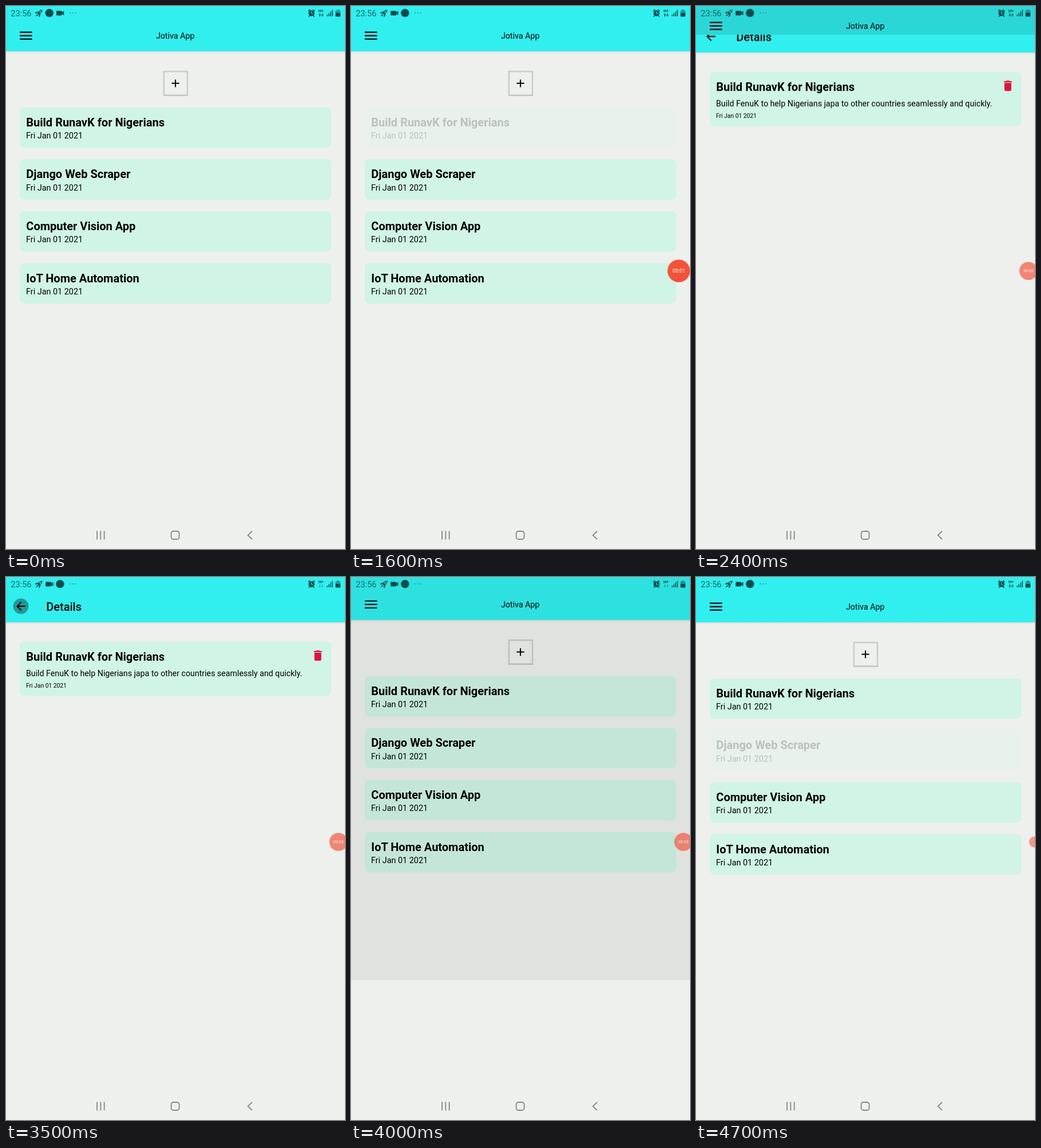
Recreate the animation shown at these times as an HTML page. Size 592x947 px, loop 5000 ms.

```html
<!DOCTYPE html>
<html lang="en">
<head>
<meta charset="utf-8">
<title>Idea list</title>
<style>
  html, body { margin: 0; height: 100%; overflow: hidden; background: #eef0ed; }
  svg { display: block; width: 592px; height: 947px; font-family: Roboto, sans-serif; }

  .page { fill: #eef0ed; }
  .bar { fill: #30efee; }
  .tile { fill: #d0f4e6; }
  .name { font-size: 20px; font-weight: 700; }
  .note, .app { font-size: 14.2px; }
  .date { font-size: 14.4px; }
  .small { font-size: 10.3px; }
  .heading { font-size: 20px; font-weight: 500; }
  .mid { text-anchor: middle; }
  .status { fill: #0f4a4d; }
  .nav { fill: none; stroke: #858785; stroke-width: 1.8; }

  /* All screen parts share one reveal curve. */
  .list, .sheet, .content { animation: 5s cubic-bezier(.35, .45, 0, 1) infinite; }
  .list { animation-name: list; }
  .sheet { animation-name: sheet; }
  .content { animation-name: content; }
  @keyframes list {
    0%, 42.4%, 86.8%, 100% { transform: translateY(0); }
    52.4%, 76.8% { transform: translateY(-18px); }
  }
  @keyframes sheet {
    0%, 42.4%, 86.8%, 100% { transform: translateY(899px); }
    52.4%, 76.8% { transform: translateY(0); }
  }
  @keyframes content {
    0%, 42.4%, 86.8%, 100% { transform: translateY(-862.1px); }
    52.4%, 76.8% { transform: translateY(0); }
  }

  .shade { opacity: 0; animation: shade 5s linear infinite; }
  @keyframes shade {
    0%, 42.4% { opacity: 0; }
    44.1% { opacity: .1; }
    79.2% { opacity: .1; animation-timing-function: cubic-bezier(.1, .58, .3, 1); }
    86.8%, 100% { opacity: 0; }
  }

  .press-first { animation: press-first 5s ease-in-out infinite; }
  @keyframes press-first {
    0% { opacity: 1; animation-timing-function: step-end; }
    32%, 42.4% { opacity: .2; }
    47.4%, 100% { opacity: 1; }
  }
  .press-second { animation: press-second 5s step-end infinite; }
  @keyframes press-second {
    0% { opacity: 1; }
    94%, 100% { opacity: .2; }
  }

  .ripple { opacity: 0; animation: ripple 5s linear infinite; }
  @keyframes ripple {
    0% { opacity: 0; animation-timing-function: step-end; }
    70% { opacity: .36; }
    77%, 100% { opacity: 0; }
  }

  .badge { animation: badge 5s ease-out infinite; }
  @keyframes badge {
    0%, 1% { transform: scale(.4); opacity: 0; }
    8%, 44% { transform: none; opacity: 1; }
    48%, 82% { transform: translateX(8px) scale(.8); opacity: .68; }
    86%, 100% { transform: translateX(19px) scale(.5); opacity: .55; }
  }
  .tick { fill: #fff; font-size: 8.9px; opacity: 0; animation: tick 5s step-end infinite; }
  @keyframes tick {
    0% { opacity: 1; }
    20%, 100% { opacity: 0; }
  }

  .dot { animation: dot 5s ease-in-out infinite; }
  @keyframes dot {
    0%, 13% { transform: none; }
    20%, 100% { transform: translateX(18.6px); }
  }
  .camera { animation: camera 5s ease-in-out infinite; }
  @keyframes camera {
    0%, 13% { transform: none; }
    20%, 100% { transform: translateX(-18.8px); }
  }
  .traffic { animation: traffic 5s step-end infinite; }
  @keyframes traffic {
    0%, 86%, 100% { opacity: 1; }
    70% { opacity: .35; }
  }
</style>
</head>
<body>
<svg viewBox="0 0 592 947">
  <defs>
    <clipPath id="screen"><rect width="592" height="899"/></clipPath>
    <linearGradient id="fade" x2="0" y2="1">
      <stop stop-opacity=".09"/><stop offset="1" stop-opacity="0"/>
    </linearGradient>
    <rect id="tile" class="tile" x="24" width="544" height="70.6" rx="8"/>
    <g id="header">
      <rect y="79" width="592" height="3" fill="url(#fade)"/>
      <rect class="bar" width="592" height="79"/>
    </g>
  </defs>

  <rect class="page" width="592" height="947"/>

  <g class="list">
    <rect class="page" width="592" height="947"/>
    <use href="#header"/>
    <path d="M24 45.8h21.6M24 51.8h21.6M24 57.8h21.6" stroke="#061b1b" stroke-width="2.4"/>
    <text class="app mid" x="295.5" y="57.2">Jotiva App</text>

    <rect x="275.8" y="114.2" width="41" height="41.4" fill="none" stroke="#cbcdcb" stroke-width="2.6"/>
    <path d="M275 156.4h42.6" stroke="#b9bbb9"/>
    <path d="M289.3 134.8h13.2M295.9 128.2v13.2" stroke="#000" stroke-width="2"/>

    <g class="press-first" transform="translate(0 176.6)">
      <use href="#tile"/>
      <text class="name" x="35.3" y="33">Build RunavK for Nigerians</text>
      <text class="date" x="35" y="54.4">Fri Jan 01 2021</text>
    </g>
    <g class="press-second" transform="translate(0 267.2)">
      <use href="#tile"/>
      <text class="name" x="35.3" y="33">Django Web Scraper</text>
      <text class="date" x="35" y="54.4">Fri Jan 01 2021</text>
    </g>
    <g transform="translate(0 357.8)">
      <use href="#tile"/>
      <text class="name" x="35.3" y="33">Computer Vision App</text>
      <text class="date" x="35" y="54.4">Fri Jan 01 2021</text>
    </g>
    <g transform="translate(0 448.5)">
      <use href="#tile"/>
      <text class="name" x="35.3" y="33">IoT Home Automation</text>
      <text class="date" x="35" y="54.4">Fri Jan 01 2021</text>
    </g>
  </g>
  <rect class="shade" width="592" height="947"/>

  <g class="sheet" clip-path="url(#screen)">
    <rect class="page" width="592" height="899"/>
    <g class="content">
      <use href="#header"/>
      <circle class="ripple" cx="26" cy="51" r="13.4"/>
      <path transform="translate(14 39)" d="M20 11H7.8l5.6-5.6L12 4l-8 8 8 8 1.4-1.4L7.8 13H20z"/>
      <text class="heading" x="70.2" y="59.2">Details</text>
      <rect class="tile" x="24" y="112.7" width="544" height="94.6" rx="8"/>
      <text class="name" x="35.3" y="146.2">Build RunavK for Nigerians</text>
      <text class="note" x="35" y="172.8">Build FenuK to help Nigerians japa to other countries seamlessly and quickly.</text>
      <text class="small" x="35" y="192.5">Fri Jan 01 2021</text>
      <path transform="translate(532.6 125)" fill="#dc143c"
        d="M6 19c0 1.1.9 2 2 2h8c1.1 0 2-.9 2-2V7H6zM19 4h-3.5l-1-1h-5l-1 1H5v2h14z"/>
    </g>
  </g>

  <g class="status">
    <text x="8.2" y="18" font-size="14.6" fill="#17696b">23:56</text>
    <g transform="translate(57.8 12.2) rotate(45)">
      <path d="M0-8C2.800-5.500 3-1.500 2.200 2.500h-4.400C-3-1.500-2.800-5.500 0-8zM-3-.5-4.800 2v3.500l2.400-2zM3-.5 4.800 2v3.500l-2.400-2zM-1.400 3.800h2.800L0 8.500z"/>
      <circle cy="-2.800" r="1.500" fill="#30efee"/>
    </g>
    <circle class="dot" cx="75.7" cy="12.2" r="7.1"/>
    <path class="camera" d="M89 8.4h7.6q1 0 1 1v1.6l3.6-2.4v7.6l-3.6-2.4v1.6q0 1-1 1H89q-1 0-1-1V9.4q0-1 1-1z"/>
    <g fill="#2a8587">
      <circle cx="112.3" cy="12" r=".9"/><circle cx="117" cy="12" r=".9"/><circle cx="121.7" cy="12" r=".9"/>
    </g>

    <circle cx="533.5" cy="12.5" r="5.2"/>
    <path d="M527.8 9l3-2.8M539.2 9l-3-2.8M530 17l-1.4 1.6M537 17l1.4 1.6" stroke="#0f4a4d" stroke-width="1.6"/>
    <path d="M533.5 9.3v3.4l2.4 1.6" fill="none" stroke="#30efee" stroke-width="1.1"/>
    <text class="mid" x="550.2" y="11.2" font-size="7" font-weight="700">H+</text>
    <path class="traffic" d="M546 15.5l2-2.6 2 2.6h-1.3v2.8h-1.4v-2.8zM550.6 15.8h1.3V13h1.4v2.8h1.3l-2 2.6z"/>
    <path d="M560.2 15h1.5v3h-1.5zM563.2 12.4h1.5V18h-1.5zM566.2 9.6h1.5V18h-1.5zM569.2 6.8h1.5V18h-1.5z"/>
    <path d="M578 6h3.4v1.4h1.6q1 0 1 1V12h-8.6V8.4q0-1 1-1H578z" opacity=".5"/>
    <path d="M575.4 12H584v5.4q0 1-1 1h-6.6q-1 0-1-1z"/>
  </g>

  <rect class="page" y="899" width="592" height="48"/>
  <g class="nav">
    <path d="M159 915.5v15M165.3 915.5v15M171.6 915.5v15"/>
    <rect x="288.5" y="916" width="14" height="14" rx="4"/>
    <path d="M429.8 916l-7.4 7 7.4 7"/>
  </g>

  <g transform="translate(572.4 462)">
    <g class="badge">
      <circle r="19.7" fill="#f0533a"/>
      <text class="tick mid" y="3.2" style="animation-delay: .2s">00:00</text>
      <text class="tick mid" y="3.2" style="animation-delay: 1.2s">00:01</text>
      <text class="tick mid" y="3.2" style="animation-delay: 2.2s">00:02</text>
      <text class="tick mid" y="3.2" style="animation-delay: 3.2s">00:03</text>
    </g>
  </g>
</svg>
<script>
  // Drive every CSS animation from one clock that advances in 100 ms steps.
  const LOOP = 5000, STEP = 100;
  const start = performance.now();
  const animations = document.getAnimations();
  animations.forEach(animation => animation.pause());

  function render() {
    const elapsed = (performance.now() - start) % LOOP;
    const time = Math.floor(elapsed / STEP) * STEP;
    for (const animation of animations) animation.currentTime = time;
    requestAnimationFrame(render);
  }
  render();
</script>
</body>
</html>
```
